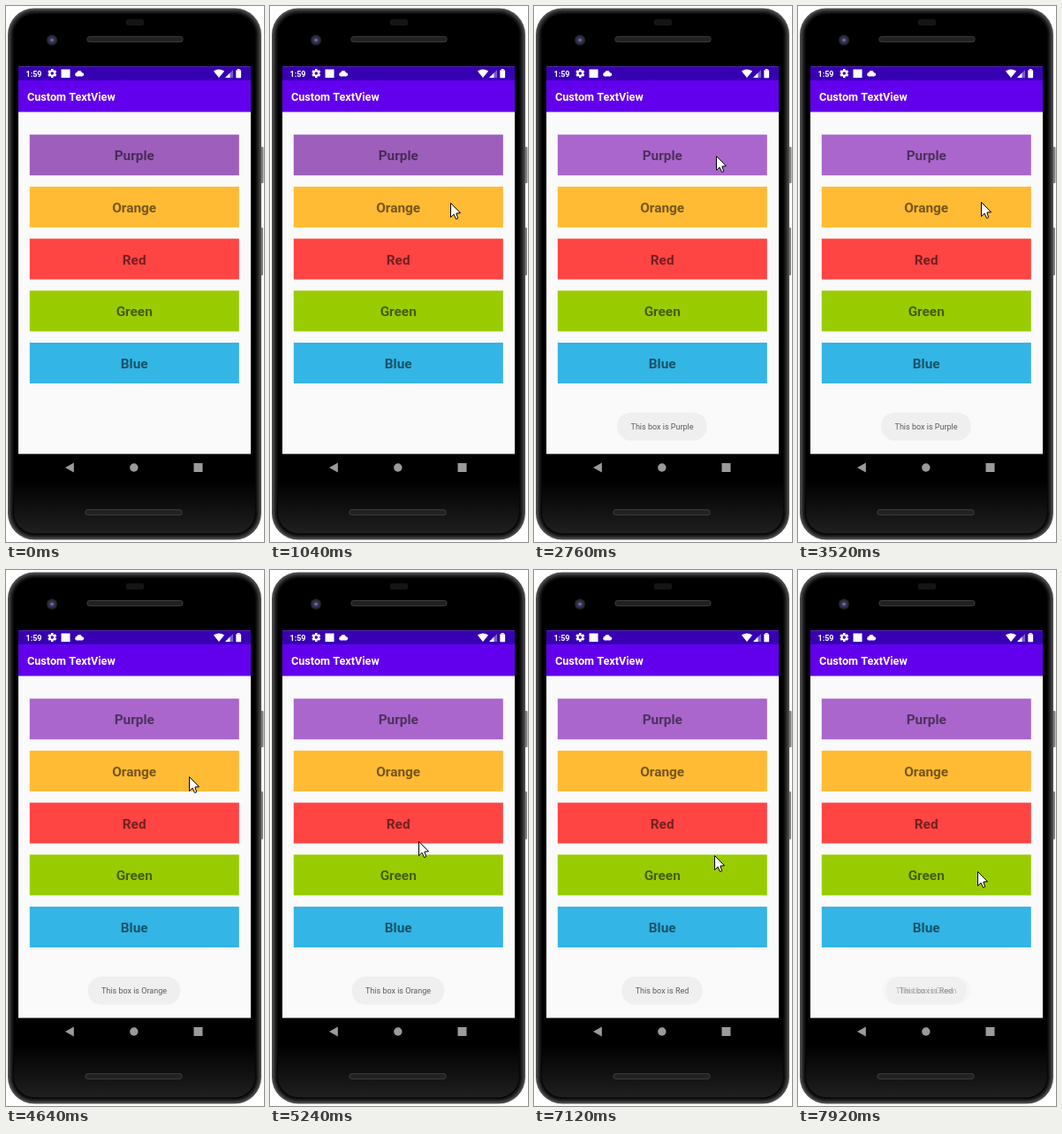
Write an HTML page with a canvas that moves like this. It is 292x605 px and loops after 8000 ms.

```html
<!DOCTYPE html>
<html lang="en">
<head>
<meta charset="utf-8">
<title>Custom TextView</title>
<style>
html, body { margin: 0; width: 100%; height: 100%; overflow: hidden; background: #fff; }
canvas { display: block; width: 292px; height: 605px; }
</style>
</head>
<body>
<canvas id="stage"></canvas>
<script>
const W = 292, H = 605, LOOP = 8000, TICK = 40;
const FONT = 'Roboto, sans-serif';
const canvas = document.getElementById('stage');
const ctx = canvas.getContext('2d');
const dpr = window.devicePixelRatio || 1;
canvas.width = W * dpr;
canvas.height = H * dpr;

const SCREEN = { x: 14, w: 263, top: 68.5, bar: 83.8, content: 119.6, bottom: 505.6 };
const BOX = { x: 26.8, y: 145.2, w: 237, h: 46, pitch: 58.7 };
const COLORS = [
  ['Purple', '#aa66cc'], ['Orange', '#ffbb33'], ['Red', '#ff4444'],
  ['Green', '#99cc00'], ['Blue', '#33b5e5']
];
const TOASTS = [
  { name: 'Purple', start: 2060, length: 540 },
  { name: 'Orange', start: 4040, length: 400 },
  { name: 'Red', start: 5990, length: 410 },
  { name: 'Green', start: 7835, length: 400 }
];
const CLICKS = [[1760, 1920], [3800, 3920], [5720, 5880], [7520, 7680]];

const clamp = v => Math.min(1, Math.max(0, v));
const progress = (t, start, length) => clamp((t - start) / length);
const lerp = (a, b, p) => a + (b - a) * p;
const easeOut = p => 1 - (1 - p) * (1 - p);
const smooth = p => p * p * (3 - 2 * p);

// Each move is a straight line or a cubic curve through its points.
const MOVES = [
  { start: 280, end: 1040, ease: easeOut, path: [[252, 583], [204, 222]] },
  { start: 1040, end: 1440, ease: smooth, path: [[204, 222], [200, 205], [202, 185], [206, 169]] },
  { start: 3000, end: 3520, ease: smooth, path: [[206, 169], [207, 221]] },
  { start: 4520, end: 5400, ease: smooth, path: [[207, 221], [218, 300], [26, 390], [207, 282]] },
  { start: 6720, end: 7360, ease: smooth, path: [[207, 282], [203, 340]] }
];

function along(path, p) {
  const q = 1 - p;
  return [0, 1].map(i => {
    const v = path.map(pt => pt[i]);
    return v.length === 2 ? lerp(v[0], v[1], p)
      : q * q * q * v[0] + 3 * q * q * p * v[1] + 3 * q * p * p * v[2] + p * p * p * v[3];
  });
}

function pointer(t) {
  const move = MOVES.filter(m => t >= m.start).pop();
  if (!move) return null;
  const p = move.ease(progress(t, move.start, move.end - move.start));
  return along(move.path, p).map(Math.round);
}

function rect(x, y, w, h, fill) {
  ctx.fillStyle = fill;
  ctx.fillRect(x, y, w, h);
}

function round(x, y, w, h, r, fill) {
  ctx.fillStyle = fill;
  ctx.beginPath();
  ctx.roundRect(x, y, w, h, r);
  ctx.fill();
}

function disc(x, y, r, fill) {
  ctx.fillStyle = fill;
  ctx.beginPath();
  ctx.arc(x, y, r, 0, Math.PI * 2);
  ctx.fill();
}

function poly(points, fill) {
  ctx.fillStyle = fill;
  ctx.beginPath();
  points.forEach(([x, y]) => ctx.lineTo(x, y));
  ctx.closePath();
  ctx.fill();
}

function label(text, x, y, style, fill, align = 'left') {
  ctx.font = `${style} ${FONT}`;
  ctx.textAlign = align;
  ctx.fillStyle = fill;
  ctx.fillText(text, x, y);
}

function speaker(x, y, w) {
  round(x, y, w, 7, 3.5, '#3a3a3a');
  round(x + 1, y + 1, w - 2, 5, 2.5, '#212121');
}

function drawBody() {
  const layers = 8;
  for (let i = 0; i <= layers; i++) {
    const gray = Math.round(84 * (1 - i / layers) ** 1.3);
    const inset = i * 0.9;
    round(2 + inset, 2.5 + inset, 287 - 2 * inset, 600 - 2 * inset, 30 - inset,
      `rgb(${gray},${gray},${gray})`);
  }
  const glow = ctx.createLinearGradient(0, 535, 0, 596);
  glow.addColorStop(0, 'rgba(32,32,32,0)');
  glow.addColorStop(1, 'rgb(32,32,32)');
  round(9.2, 535, 272.6, 60.3, [0, 0, 23, 23], glow);
}

function drawPhone() {
  round(287, 159, 4.5, 41, 1, '#808080');
  round(287, 250, 4, 54, 1, '#808080');
  drawBody();
  round(136, 15, 20, 7, 2, '#151515');
  speaker(91.5, 34, 109);
  speaker(89.5, 568, 110);
  disc(52, 38.5, 6, '#26262a');
  disc(52, 38.5, 4, '#34345a');
  disc(52, 38.5, 1.8, '#6c6ca0');

  const gray = '#9b9b9b';
  poly([[67, 521], [76.8, 515.6], [76.8, 526.6]], gray);
  disc(144.8, 521, 4.7, gray);
  rect(212.5, 516, 10, 10, gray);
}

function drawGear(x, y) {
  ctx.strokeStyle = '#fff';
  ctx.lineWidth = 2.6;
  ctx.beginPath();
  for (let i = 0; i < 3; i++) {
    const a = Math.PI / 6 + i * Math.PI / 3;
    const dx = Math.cos(a) * 5, dy = Math.sin(a) * 5;
    ctx.moveTo(x - dx, y - dy);
    ctx.lineTo(x + dx, y + dy);
  }
  ctx.stroke();
  disc(x, y, 3.8, '#fff');
  disc(x, y, 1.7, '#3700b3');
}

function drawBars() {
  const white = '#fff';
  const { x, w, top, bar, content, bottom } = SCREEN;
  rect(x, top, w, bottom - top, '#fafafa');
  rect(x, top, w, content - top, '#6200ee');
  rect(x, top, w, bar - top, '#3700b3');
  label('1:59', 22.5, 79.7, 'bold 9px', white);
  label('Custom TextView', 24, 106.5, 'bold 12.65px', white);

  drawGear(52.3, 76);
  rect(62.5, 71.5, 10, 9.5, white);
  disc(80.4, 77.2, 2.2, white);
  disc(83, 76, 2.9, white);
  disc(86, 77.3, 2.1, white);
  rect(80.4, 76.6, 5.6, 2.8, white);

  ctx.fillStyle = white;
  ctx.beginPath();
  ctx.moveTo(241, 81);
  ctx.lineTo(234.9, 73.6);
  ctx.quadraticCurveTo(241, 69.3, 247.1, 73.6);
  ctx.fill();
  poly([[248, 81], [257, 81], [257, 72]], 'rgba(255,255,255,.35)');
  poly([[248, 81], [253.5, 81], [253.5, 75.5]], white);
  round(260.3, 72.2, 5.8, 9, 0.8, white);
  rect(261.8, 71, 2.8, 1.4, white);
}

function drawRipple(t) {
  const focus = 1 - progress(t, 1880, 150);
  rect(BOX.x, BOX.y, BOX.w, BOX.h, `rgba(0,0,0,${0.08 * focus})`);
  const fade = 1 - progress(t, 2080, 440);
  if (t < 1920 || !fade) return;
  const p = easeOut(progress(t, 1880, 225));
  const x = lerp(206, BOX.x + BOX.w / 2, p);
  const y = lerp(169, BOX.y + BOX.h / 2, p);
  const r = lerp(BOX.w * 0.3, Math.hypot(BOX.w, BOX.h) / 2, p);
  ctx.save();
  ctx.beginPath();
  ctx.rect(BOX.x, BOX.y, BOX.w, BOX.h);
  ctx.clip();
  disc(x, y, r, `rgba(0,0,0,${0.11 * fade})`);
  ctx.restore();
}

function drawBoxes(t) {
  COLORS.forEach(([name, color], i) => {
    const y = BOX.y + i * BOX.pitch;
    rect(BOX.x, y, BOX.w, BOX.h, color);
    if (i === 0) drawRipple(t);
    label(name, 145.2, y + 29, 'bold 15.36px', 'rgba(0,0,0,.54)', 'center');
  });
}

function drawToast(name, alpha) {
  if (alpha <= 0) return;
  const text = `This box is ${name}`;
  ctx.save();
  ctx.globalAlpha = alpha;
  ctx.font = `9px ${FONT}`;
  const w = ctx.measureText(text).width + 31;
  round(145 - w / 2, 459, w, 31.5, 15.7, '#efefef');
  label(text, 145, 478.3, '9px', '#5c5c5c', 'center');
  ctx.restore();
}

function drawToasts(t) {
  const shown = toast => toast ? easeOut(progress(t, toast.start, toast.length)) : 0;
  TOASTS.forEach((toast, i) => {
    const next = shown(TOASTS[i + 1]);
    drawToast(toast.name, shown(toast) * (1 - next * next));
  });
}

function drawPointer(t) {
  const at = pointer(t);
  if (!at) return;
  ctx.save();
  ctx.translate(at[0] + 0.5, at[1] + 0.5);
  poly([[0, 0], [0, 16], [3.6, 12.6], [6.1, 18], [8.2, 17.2], [6.4, 11.5], [11, 11.2]], '#fff');
  ctx.strokeStyle = '#000';
  ctx.lineWidth = 1;
  ctx.stroke();
  ctx.restore();
  if (CLICKS.some(([from, to]) => t >= from && t < to)) {
    disc(at[0], at[1], 12, 'rgba(255,255,0,.47)');
  }
}

function draw(t) {
  ctx.setTransform(dpr, 0, 0, dpr, 0, 0);
  rect(0, 0, W, H, '#fff');
  drawPhone();
  drawBars();
  drawBoxes(t);
  drawToasts(t);
  drawPointer(t);
}

const begin = performance.now();
function frame() {
  const t = (performance.now() - begin) % LOOP;
  draw(Math.floor(t / TICK) * TICK);
  requestAnimationFrame(frame);
}
frame();
</script>
</body>
</html>
```
